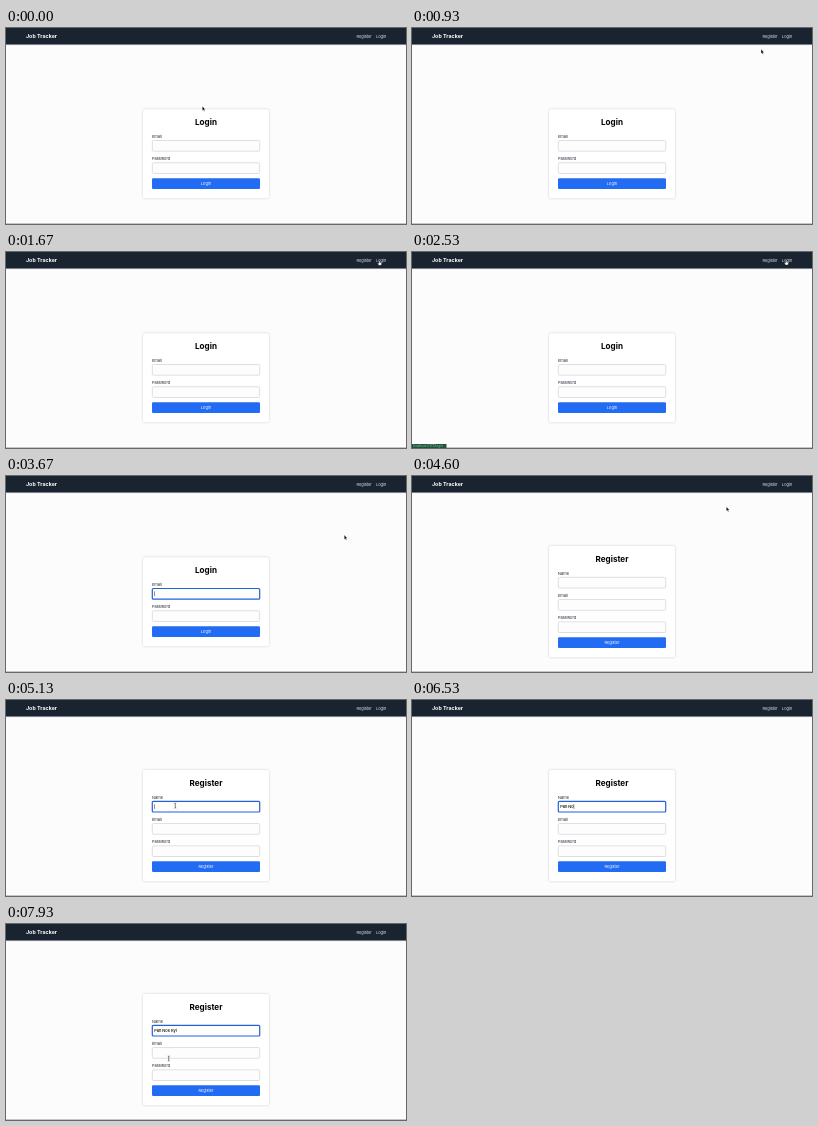
These frames come from a looping animation (400x196 px, 8000 ms). An HTML page:

```html
<!DOCTYPE html>
<html lang="en">
<head>
<meta charset="utf-8">
<title>Job Tracker</title>
<style>
  html, body { margin: 0; width: 100%; height: 100%; overflow: hidden; background: #fcfcfd; }
  svg { display: block; width: 400px; height: 196px; }
  text { font: 3.94px Inter, sans-serif; fill: #1f2733; white-space: pre; }
  .brand { font-size: 5.35px; font-weight: 700; fill: #fff; }
  .nav { fill: #e4e7eb; }
  .title { font-size: 8.1px; font-weight: 700; fill: #000; text-anchor: middle; }
  .submit { fill: #fff; text-anchor: middle; }
  .card { fill: #fff; filter: drop-shadow(0 .8px 1.1px #0003); }
  .field { fill: #fdfdfd; stroke: #c9ccd1; stroke-width: .6; }
  .focus { stroke: #2360d8; stroke-width: 1.2; }
  .typed { font-size: 3.9px; font-weight: 500; fill: #000; }
  .status text { font-size: 3.2px; fill: #79c99c; }
</style>
</head>
<body>
<svg viewBox="0 0 400 196">
  <rect width="400" height="196" fill="#fcfcfd"/>
  <rect width="400" height="17.2" fill="#dcdde4"/>
  <rect width="400" height="16.5" fill="#1a2430"/>
  <text class="brand" x="20" y="10.4">Job Tracker</text>
  <text class="nav" x="350.5" y="9.9">Register</text>
  <text class="nav" x="370" y="9.9">Login</text>
  <g id="login"></g>
  <g id="register"></g>
  <text id="typed" class="typed" x="148.3" y="108"></text>
  <rect id="caret" width=".5" height="4.6" fill="#222"/>
  <rect y="195" width="400" height="1" fill="#c4c6c8"/>
  <g id="status" class="status">
    <rect id="statusBox" y="192" height="4" fill="#24503d"/>
    <text id="statusText" x="1" y="195.1"></text>
  </g>
  <g id="cursor">
    <path id="arrow" d="M0 0V4.3L1 3.4L1.7 5L2.5 4.6L1.8 3.1H3.1Z" fill="#000" stroke="#fff" stroke-width=".35"/>
    <path id="hand" d="M-.3 0Q.5-.6.6.3V1.6L2.3 2.1V3.5L1.7 4.6H-.4L-1.6 2.7L-1.1 2.3L-.3 2.8Z" fill="#fff" stroke="#333" stroke-width=".35"/>
    <path id="beam" d="M-.9-2.5Q0-2.5 0-2Q0-2.5.9-2.5M0-2V2M-.9 2.5Q0 2.5 0 2Q0 2.5.9 2.5" fill="none" stroke="#333" stroke-width=".6"/>
  </g>
</svg>
<script>
const LOOP = 8000;
const $ = id => document.getElementById(id);
const show = (id, on) => $(id).style.display = on ? '' : 'none';
const between = (t, a, b) => t >= a && t < b;

// Builds a centred form card from its title and field labels
function buildForm(id, title, top, labels) {
  const pitch = 22.25;
  const buttonY = top + 24.5 + labels.length * pitch;
  const fields = labels.map((label, i) => {
    const y = top + 31 + i * pitch;
    return `<text x="146" y="${y - 2.1}">${label}</text>
      <rect class="field" x="146.3" y="${y + .3}" width="107.4" height="10.7" rx="1"/>`;
  }).join('');
  $(id).innerHTML = `<rect class="card" x="137" y="${top}" width="126" height="${buttonY + 20 - top}" rx="2"/>
    <text class="title" x="200" y="${top + 16}">${title}</text>${fields}
    <rect x="146" y="${buttonY}" width="108" height="10.8" rx="1.2" fill="#226bf3"/>
    <text class="submit" x="200" y="${buttonY + 6.8}">${title}</text>`;
  return $(id).querySelector('.field');
}
const loginField = buildForm('login', 'Login', 81.2, ['Email', 'Password']);
const nameField = buildForm('register', 'Register', 70, ['Name', 'Email', 'Password']);

const smooth = p => p * p * (3 - 2 * p);
const easeOut = p => 1 - (1 - p) ** 2;
const linear = p => p;

// time, x, y, easing used to arrive
const path = [
  [0, 196.3, 78.3], [70, 196.3, 78.3], [870, 349.5, 22.5, smooth], [930, 349, 21.3, linear],
  [1730, 373.6, 8.5, smooth], [2230, 373.6, 8.5], [2270, 374, 8.3, linear], [2560, 374, 8.3],
  [3270, 222, 118, smooth], [3400, 222, 118], [3670, 338.2, 59.3, linear],
  [4200, 354.3, 10.2, easeOut], [4400, 354.3, 10.2], [5070, 169.3, 105.6, smooth],
  [7560, 169.3, 105.6], [7930, 162.7, 134.5, smooth], [LOOP, 162.7, 134.5]
];
function cursorAt(t) {
  const i = path.findIndex(k => k[0] > t);
  const [t0, x0, y0] = path[i - 1], [t1, x1, y1, ease = linear] = path[i];
  const p = ease((t - t0) / (t1 - t0));
  return [x0 + (x1 - x0) * p, y0 + (y1 - y0) * p];
}

const fullName = 'Pan Noe Kyi';
const keyTimes = [5530, 5800, 5870, 6070, 6200, 6330, 6870, 7070, 7130, 7270, 7400];

function draw(t) {
  const registering = t >= 4470;
  show('login', !registering);
  show('register', registering);

  const emailFocus = between(t, 3270, 4200), nameFocus = t >= 5070;
  loginField.classList.toggle('focus', emailFocus);
  nameField.classList.toggle('focus', nameFocus);

  const typed = $('typed');
  typed.textContent = fullName.slice(0, keyTimes.filter(k => k <= t).length);
  const width = typed.textContent ? typed.getComputedTextLength() : 0;
  show('caret', emailFocus || nameFocus && t < 7800);
  $('caret').setAttribute('x', 148.3 + width);
  $('caret').setAttribute('y', emailFocus ? 115.4 : 104.3);

  const overLogin = between(t, 2000, 2730), overRegister = between(t, 4260, 4600);
  show('status', overLogin || overRegister);
  $('statusBox').setAttribute('width', overLogin ? 34.5 : 39);
  $('statusText').textContent = 'localhost:5173/' + (overLogin ? 'login' : 'register');

  const [x, y] = cursorAt(t);
  const inField = x > 146 && x < 254 && (registering
    ? [101, 123.3, 145.5].some(top => between(y, top, top + 11.3))
    : [112.2, 134.5].some(top => between(y, top, top + 11.3)));
  const onLink = between(y, 5, 12.5) && (between(x, 350, 366) || between(x, 370, 381));
  $('cursor').setAttribute('transform', `translate(${x} ${y})`);
  show('cursor', !between(t, 5470, 7560));
  show('beam', inField);
  show('hand', onLink);
  show('arrow', !inField && !onLink);
}

function tick() {
  draw(performance.now() % LOOP);
  requestAnimationFrame(tick);
}
tick();
</script>
</body>
</html>
```
